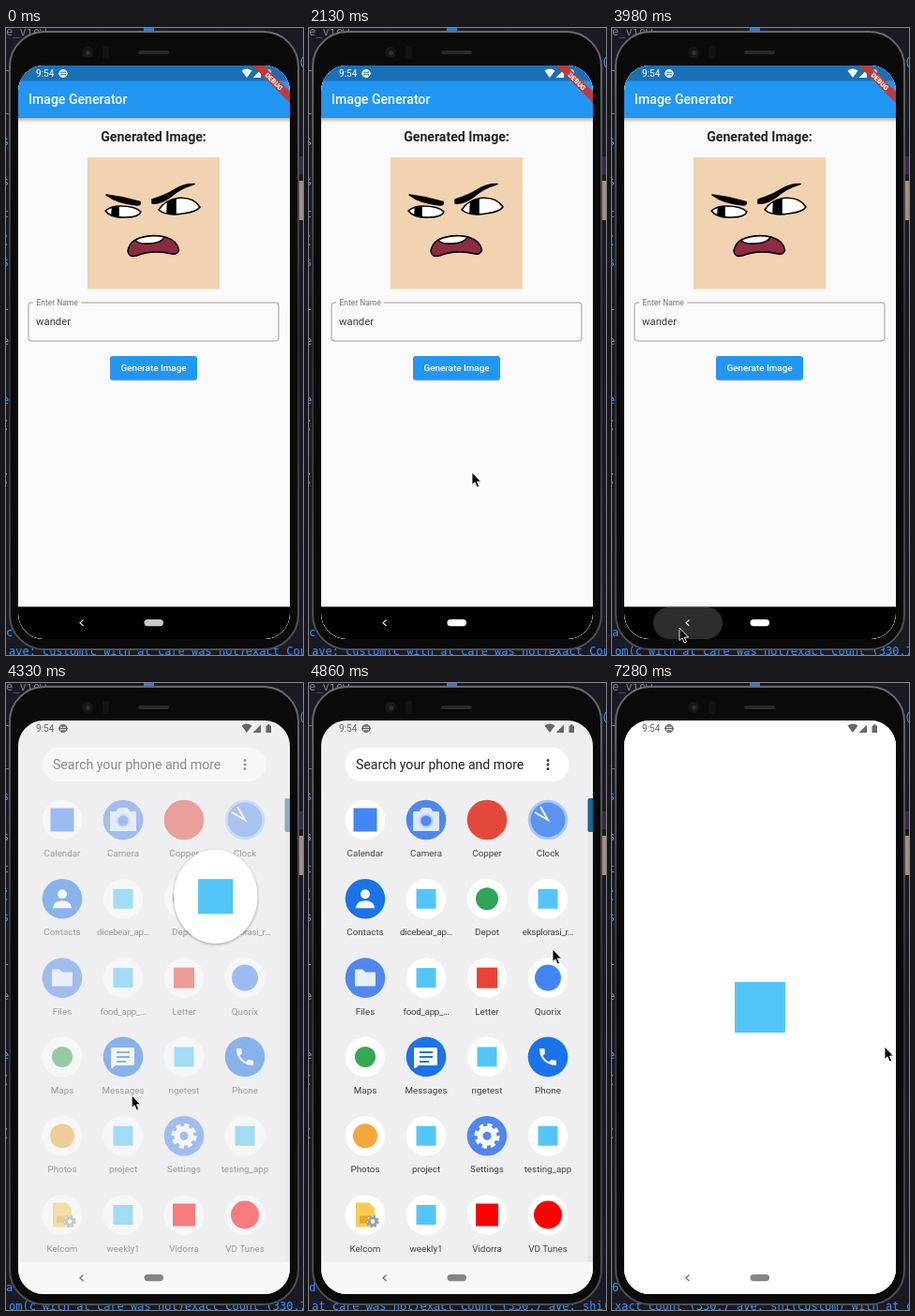
An HTML page for the animation above (8 s loop, 317x669 px).

```html
<!DOCTYPE html>
<html lang="en">
<head>
<meta charset="utf-8">
<title>Image Generator</title>
<style>
html, body { margin: 0; width: 100%; height: 100%; overflow: hidden; background: #191a24; }
svg { display: block; width: 317px; height: 669px; font-family: Roboto, "Liberation Sans", sans-serif; }
.mono { font: 12px "DejaVu Sans Mono", "Liberation Mono", monospace; white-space: pre; }
.mid { text-anchor: middle; }
.lifted { filter: drop-shadow(0 1px 1.5px #0005); }
</style>
</head>
<body>
<svg viewBox="0 0 317 669">
  <defs>
    <clipPath id="screenClip"><rect x="13" y="40" width="290" height="612" rx="27"/></clipPath>
    <clipPath id="winClip"><rect id="winRect"/></clipPath>
    <linearGradient id="barShadow" x2="0" y2="1">
      <stop stop-color="#000" stop-opacity=".28"/><stop offset="1" stop-color="#000" stop-opacity="0"/>
    </linearGradient>
    <linearGradient id="edge" x2="0" y2="1">
      <stop stop-color="#6a6a6d"/><stop offset=".5" stop-color="#2b2b2d"/><stop offset="1" stop-color="#505052"/>
    </linearGradient>
  </defs>

  <!-- editor behind the phone -->
  <rect width="317" height="669" fill="#191a24"/>
  <g id="editor" class="mono"></g>
  <rect x="147" width="11" height="3" fill="#2d7fd0"/>
  <rect x="312" y="137" width="5" height="19" fill="#352b52"/>
  <rect x="313" y="163" width="4" height="42" fill="#a58f80"/>
  <g class="mono" fill="#3794ff">
    <text id="logA" x="0" y="649"/>
    <text id="logB" x="3" y="669"/>
  </g>

  <!-- phone body -->
  <rect x="4" y="4" width="308" height="659" rx="37" fill="#0a0a0b" stroke="url(#edge)" stroke-width="2"/>
  <circle cx="87" cy="26" r="6" fill="#17171a"/>
  <circle cx="87.5" cy="26.5" r="2.5" fill="#2e2e36"/>
  <rect x="103" y="19" width="7" height="14" rx="2" fill="#131315"/>
  <rect x="141" y="24" width="33" height="4" rx="2" fill="#29292c"/>

  <g clip-path="url(#screenClip)">
    <rect x="13" y="40" width="290" height="612" fill="#efeff1"/>
    <rect x="13" y="618" width="290" height="34" fill="#f8f8f9"/>
    <g id="launcher"></g>

    <g id="window"><g clip-path="url(#winClip)">
      <rect x="13" y="40" width="290" height="612" fill="#fff"/>
      <rect id="logo" fill="#54c5f8"/>
      <g id="app">
        <rect x="13" y="40" width="290" height="578" fill="#fafafa"/>
        <rect x="13" y="96" width="290" height="5" fill="url(#barShadow)"/>
        <rect x="13" y="40" width="290" height="56" fill="#2196f3"/>
        <rect x="13" y="40" width="290" height="16.5" fill="#1970b6"/>
        <g id="lightStatus"></g>
        <text x="24" y="81" font-size="14.1" font-weight="500" fill="#fff">Image Generator</text>
        <text x="157.5" y="121" class="mid" font-size="14.1" font-weight="700" fill="#222">Generated Image:</text>

        <rect x="87" y="138" width="141" height="140.5" fill="#f2d3b1"/>
        <g stroke="#000" stroke-width="1.6" stroke-linejoin="round" fill="#fff">
          <path d="M106 195Q112 190 122 190Q138 190 144 196Q142 202 128 202Q112 203 106 195Z"/>
          <path d="M163 194Q169 184 183 181.5Q200 180 207 191Q204 196 189 198Q171 201 163 194Z"/>
          <path d="M113.5 191.5L120 190.5V201.5L113 199Z" fill="#000"/>
          <path d="M172.5 186L181 182.5V198.5L172 197.5Z" fill="#000"/>
          <path d="M107 178Q125 180 143 185.5Q144 189 140 189Q118 187 107 178Z" fill="#000"/>
          <path d="M156 183Q170 179 181 172Q190 166 201 166.5Q186 171 177 179Q165 188 156 187Z" fill="#000"/>
          <path d="M130 238Q132 226 146 223Q158 220 170 223Q183 227 184.5 237Q183 242 177 241Q157 236 139 243Q131 245 130 238Z" fill="#8c2b42"/>
          <path d="M138 226Q154 219.5 169 223Q167 229 154 230Q140 231 138 226Z"/>
        </g>

        <rect x="24" y="293" width="267" height="41" rx="3" fill="none" stroke="#9b9b9b"/>
        <rect x="29" y="291" width="51" height="4" fill="#fafafa"/>
        <text x="32.5" y="295.5" font-size="8.47" fill="#757575">Enter Name</text>
        <text x="32" y="317" font-size="11.3" fill="#3a3a3a">wander</text>
        <rect x="111" y="351.5" width="93" height="25" rx="3" fill="#000" opacity=".25"/>
        <rect x="111" y="350" width="93" height="25.4" rx="3" fill="#2196f3"/>
        <text x="157.5" y="366" class="mid" font-size="9.88" font-weight="500" fill="#fff">Generate Image</text>

        <g transform="translate(303 40) rotate(45)">
          <rect x="-30" y="19.8" width="60" height="8.5" fill="#c23a36"/>
          <text y="26.7" class="mid" font-size="7.2" font-weight="900" fill="#fff">DEBUG</text>
        </g>
        <rect x="13" y="617.5" width="290" height="35" fill="#000"/>
      </g>
    </g></g>

    <g id="darkStatus"></g>
    <rect id="ripple" x="44" y="618" width="74" height="34" rx="17" fill="#2d2d2d"/>
    <path id="back" d="M82.5 631.5L79 634.8L82.5 638" fill="none" stroke-width="1.2"/>
    <rect id="pill" x="147.5" y="631" width="20.5" height="7.2" rx="3.6"/>
  </g>

  <path id="cursor" d="M0 0V13.5L3 10.8L5.2 16L7.6 15L5.4 10H9.5Z" stroke="#fff" stroke-width=".9"/>
</svg>

<script>
const $ = id => document.getElementById(id);
const set = (el, props) => { for (const k in props) el.setAttribute(k, props[k]); };
const show = (el, on) => { el.style.display = on ? "" : "none"; };
const mix = (a, b, k) => a + (b - a) * k;
const ramp = (t, from, to) => Math.min(1, Math.max(0, (t - from) / (to - from)));
const smooth = k => k * k * (3 - 2 * k);

const status = color => `
  <g fill="${color}">
    <text x="32" y="52" font-size="10.1">9:54</text>
    <path d="M251.5 45.5Q257 41.5 262.5 45.5L257 53ZM263.5 53H272V44.5ZM277.5 45.5H279V44.3H281.5V45.5H283V53H277.5Z"/>
    <g fill="none" stroke="${color}" stroke-width="1.3">
      <circle cx="61" cy="48.5" r="3.9"/><path d="M56 48.5H66M59 51H63M58.5 46H63.5"/>
    </g>
  </g>`;

// Icon parts, drawn round the middle of each icon.
const disc = (c, r = 21.3) => `<circle r="${r}" fill="${c}"/>`;
const box = (c, s) => `<rect x="${-s / 2}" y="${-s / 2}" width="${s}" height="${s}" fill="${c}"/>`;
const white = mark => disc("#fff") + mark;
const soft = (d, c) => `<path d="${d}" fill="${c}" stroke="${c}" stroke-width="2" stroke-linejoin="round"/>`;
const gear = (c, k) => `<g transform="scale(${k})" fill="none" stroke="${c}">
  <circle r="7.5" stroke-width="6"/><circle r="11.5" stroke-width="4" stroke-dasharray="5 4.03"/></g>`;
const tile = white(box("#54c5f8", 21));
const blue = "#4f87ee", deep = "#1a73e8";

const apps = [
  ["Calendar", white(box("#4285f4", 25))],
  ["Camera", disc(blue) + soft("M-13 -8H-7L-4 -12H4L7 -8H13V11H-13Z", "#dce8fd") +
    `<circle r="6.5" cy="1" fill="${blue}" stroke="#b4cffb" stroke-width="2"/>`],
  ["Copper", disc("#e2493b")],
  ["Clock", disc("#a9c8fa") + disc("#5b94f1", 18.5) +
    `<path d="M-14 -8L0 0L-8 -14" fill="none" stroke="#fff" stroke-width="2"/>`],
  ["Contacts", disc(deep) + `<circle cy="-5" r="5" fill="#fff"/><path d="M-10 9Q-9 2 0 2T10 9V10H-10Z" fill="#fff"/>`],
  ["dicebear_ap…", tile],
  ["Depot", white(disc("#2fa45a", 12))],
  ["eksplorasi_r…", tile],
  ["Files", disc(blue) + soft("M-10 -8H-3L0 -5H10V8H-10Z", "#e6effe")],
  ["food_app_…", tile],
  ["Letter", white(box("#ea4335", 22))],
  ["Quorix", white(disc("#4285f4", 14))],
  ["Maps", white(disc("#34a853", 11))],
  ["Messages", disc(deep) + soft("M-12 -9H11V8H-8L-12 11Z", "#fff") +
    `<path d="M-7 -5H7M-7 0H7M-7 5H3" stroke="${deep}" stroke-width="2"/>`],
  ["ngetest", tile],
  ["Phone", disc(deep) + `<path transform="translate(-12 -12)" fill="#fff" d="M6.6 10.8C8 13.6 10.4 15.9 13.2 17.4L15.4 15.2Q15.9 14.7 16.4 15Q18 15.5 20 15.5Q21 15.5 21 16.5V20Q21 21 20 21C10.6 21 3 13.4 3 4Q3 3 4 3H7.5Q8.5 3 8.5 4Q8.5 6 9.1 7.6Q9.2 8.2 8.8 8.6Z"/>`],
  ["Photos", white(disc("#f2a93b", 13))],
  ["project", tile],
  ["Settings", disc(blue) + gear("#fff", 1)],
  ["testing_app", tile],
  ["Kelcom", white(`<path d="M-10 -13H4L10 -7V13H-10Z" fill="#fbcb4f"/><path d="M-6 1H5V9H-6Z" fill="#e0a92d"/>
    <g transform="translate(8 7)">${disc("#fff", 6)}${gear("#9aa0a6", .5)}</g>`)],
  ["weekly1", tile],
  ["Vidorra", white(box("#f00", 24))],
  ["VD Tunes", white(disc("#f00", 15))],
];
const appSlot = apps.findIndex(([name]) => name.startsWith("eksplorasi"));

$("launcher").innerHTML = `
  <rect x="38.5" y="69" width="239" height="36" rx="18" fill="#fff"/>
  <text x="50" y="92" font-size="14.1" fill="#202124">Search your phone and more</text>
  <path d="M255 82.5v0m0 4.5v0m0 4.5v0" stroke="#17502f" stroke-width="3" stroke-linecap="round"/>
  <rect x="298" y="123" width="5" height="495" fill="#e3e4e8"/>
  <rect x="297.5" y="123" width="7" height="36" rx="2" fill="#17678f"/>` +
  apps.map(([name, art], i) => {
    const x = 60 + 65 * (i % 4), y = 146 + 84.3 * Math.floor(i / 4);
    const tight = name.endsWith("…") ? 'letter-spacing="-.3"' : "";
    return `<g transform="translate(${x} ${y})"><g id="icon${i}">${art}</g>
      <text y="39" class="mid" font-size="9.8" fill="#3c4043" ${tight}>${name}</text></g>`;
  }).join("");
$("lightStatus").innerHTML = status("#fff");
$("darkStatus").innerHTML = status("#666");

// Ends of code lines that show past the phone's left side.
let seed = 7;
const random = n => (seed = seed * 16807 % 2147483647) % n;
let code = `<text y="8" fill="#7d7f8c">e_view</text><text x="312" y="41" fill="#3794ff">(</text>`;
for (let y = 52; y < 520; y += 20 + random(50))
  code += `<text x="-4" y="${y}" fill="${["#3794ff", "#888"][random(2)]}">${"ert(sl"[random(6)]}</text>`;
$("editor").innerHTML = code;

const logText = "ave: custom(c with at care was not)exact Count (330,7 ave: shi(custom) with at care 0,730 exact";
const logTimes = [3820, 4700, 5600, 6200];

// Each move ends at a point; the optional bend is the curve's control point.
const moves = [
  { from: 140, to: 920, end: [154, 538], bend: [-165, 480] },
  { from: 970, to: 1320, end: [82, 626] },
  { from: 1650, to: 2130, end: [174, 474], bend: [50, 610] },
  { from: 3000, to: 3740, end: [72, 640], bend: [400, 120] },
  { from: 4020, to: 4800, end: [260, 284], bend: [158, 296] },
  { from: 4870, to: 5300, end: [252, 235] },
  { from: 5560, to: 5900, end: [291, 388] },
];

function mouseAt(t) {
  let p = [317, 342];
  for (const { from, to, end, bend } of moves) {
    if (t < from) break;
    const k = smooth(ramp(t, from, to)), start = p;
    const c = bend || start.map((v, i) => mix(v, end[i], .5));
    p = start.map((v, i) => mix(mix(v, c[i], k), mix(c[i], end[i], k), k));
  }
  return p;
}

// The window runs between its icon and the full screen, each part at its own pace.
const closePace = { w: 2.1, h: 2.9, x: 1.44, y: 2.1, logo: .9 };
const openPace = { w: 1.4, h: 1.26, x: 2.58, y: 1.39, logo: 2.4 };

function windowAt(closing, k) {
  const size = (part, icon, full) => {
    const left = (1 - k) ** (closing ? closePace : openPace)[part];
    return mix(icon, full, closing ? left : 1 - left);
  };
  const arc = closing ? 25 * Math.sin(Math.PI * k) : 0;
  return {
    w: size("w", 42, 290), h: size("h", 42, 612),
    x: size("x", 255, 158), y: size("y", 230.3, 346) - arc,
    logo: size("logo", 21, 54), rx: closing ? 27 + 60 * k : 21
  };
}

function draw(t) {
  const inApp = t < 4010, closing = t < 4600, opening = t >= 5640;
  const out = ramp(t, 4010, 4600), into = ramp(t, 5640, 6300);

  const [mx, my] = mouseAt(t);
  show($("cursor"), t >= 140);
  set($("cursor"), { transform: `translate(${mx} ${my})` });

  set($("launcher"), {
    opacity: ramp(t, 4060, 4620) - .74 * into,
    transform: `translate(158 346) scale(${1 - .04 * into}) translate(-158 -346)`
  });
  show($("icon" + appSlot), !closing && !opening);

  show($("window"), closing || opening);
  set($("window"), { class: closing && !inApp ? "lifted" : "" });
  const { x, y, w, h, rx, logo } = windowAt(closing, closing ? out : into);
  const left = x - w / 2, top = y - h / 2;
  set($("winRect"), { x: left, y: top, width: w, height: h, rx });
  set($("logo"), { x: x - logo / 2, y: y - logo / 2, width: logo, height: logo });
  const appAlpha = 1 - ramp(t, 4150, 4330);
  show($("app"), appAlpha > 0);
  set($("app"), {
    opacity: appAlpha,
    transform: `translate(${left} ${top}) scale(${w / 290}) translate(-13 -40)`
  });

  show($("darkStatus"), !inApp);
  show($("ripple"), inApp);
  set($("ripple"), { opacity: ramp(t, 3820, 3940) });
  const glow = mix(200, 255, ramp(t, 1650, 1800));
  set($("pill"), { fill: inApp ? `rgb(${glow},${glow},${glow})` : "#858585" });
  set($("back"), { stroke: inApp ? "#ddd" : "#6b6b6b" });

  const line = logTimes.filter(time => time <= t).length;
  $("logA").textContent = "cads6"[line];
  $("logB").textContent = logText.slice(line * 9);
}

const start = performance.now();
function tick() {
  draw((performance.now() - start) % 8000);
  requestAnimationFrame(tick);
}
tick();
</script>
</body>
</html>
```
